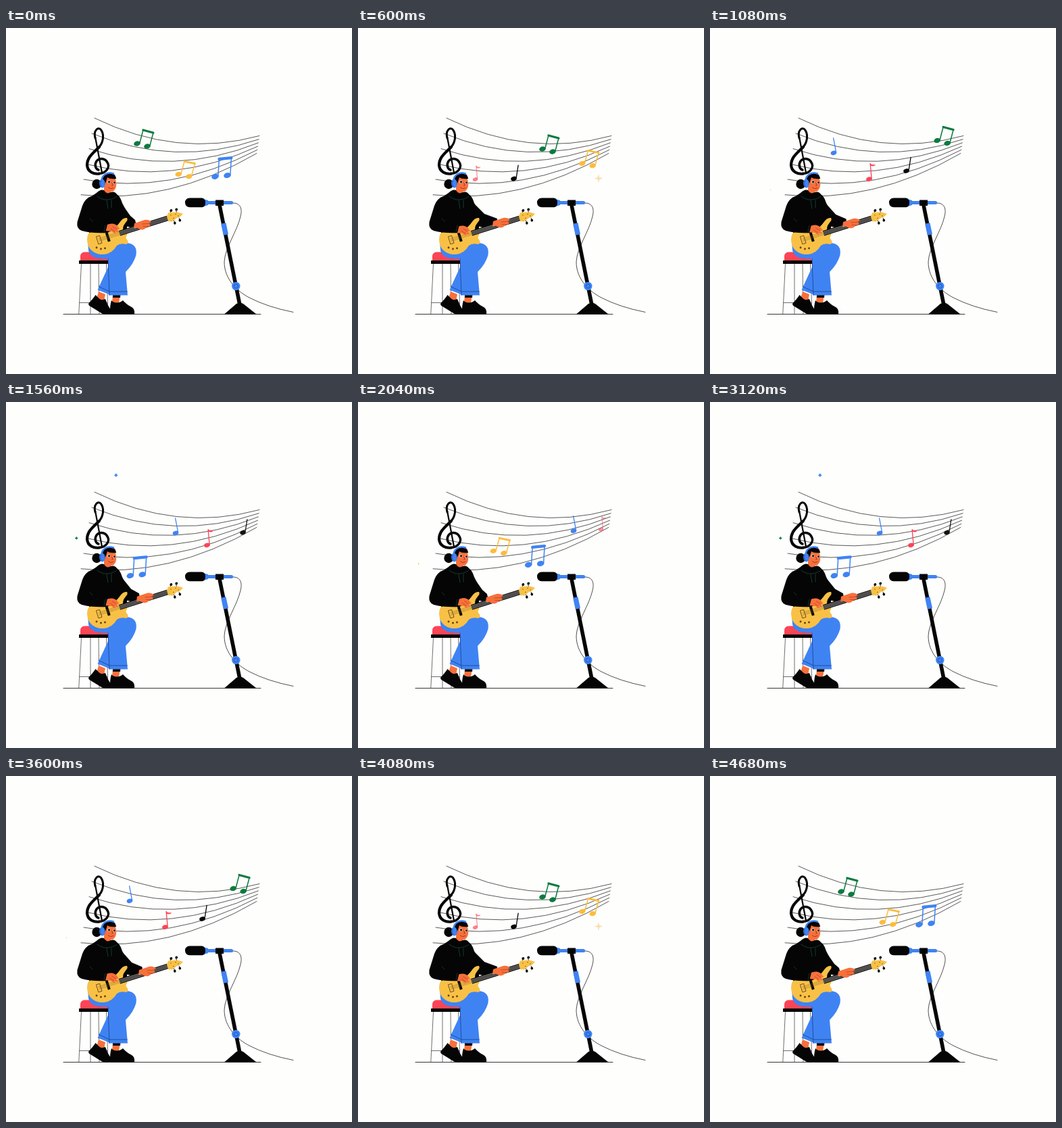
An HTML page with a canvas for the animation above (4800 ms loop, 512x512 px).

```html
<!DOCTYPE html>
<html lang="en">
<head>
<meta charset="utf-8">
<title>Guitar player</title>
<style>
html, body { margin: 0; width: 100%; height: 100%; overflow: hidden; background: #fefefd; }
canvas { display: block; width: 512px; height: 512px; }
</style>
</head>
<body>
<canvas id="stage" width="512" height="512"></canvas>
<script>
const ctx = document.getElementById('stage').getContext('2d');
const BLACK = '#050505', BLUE = '#3f83f3', RED = '#fb4455', GOLD = '#f8c146',
      YELLOW = '#fbbc3c', GREEN = '#0c7a3e', SKIN = '#f8703b';
const STEP = 120, HALF = 20, CYCLE = 20.35;

function fill(d, color) {
  ctx.fillStyle = color;
  ctx.fill(new Path2D(d));
}
function line(d, color = BLACK, width = 0.7) {
  ctx.strokeStyle = color;
  ctx.lineWidth = width;
  ctx.stroke(new Path2D(d));
}
function oval(x, y, rx, ry, color, turn = 0) {
  ctx.fillStyle = color;
  ctx.beginPath();
  ctx.ellipse(x, y, rx, ry, turn, 0, Math.PI * 2);
  ctx.fill();
}
const clamp = v => Math.max(0, Math.min(1, v));

// Eased value through [phase, value] keys
function keyed(keys, p) {
  for (let i = 1; i < keys.length; i++) {
    const [a, u] = keys[i - 1], [b, v] = keys[i];
    if (p <= b) return u + (v - u) * (1 - Math.cos(Math.PI * (p - a) / (b - a))) / 2;
  }
  return keys[keys.length - 1][1];
}

// Parabola through three points
function curveY([[a, ya], [b, yb], [c, yc]], x) {
  return ya * (x - b) * (x - c) / ((a - b) * (a - c))
       + yb * (x - a) * (x - c) / ((b - a) * (b - c))
       + yc * (x - a) * (x - b) / ((c - a) * (c - b));
}

function staff() {
  for (let i = 0; i < 6; i++) {
    const x0 = 131 - 4 * i, x1 = 375 - 0.8 * i;
    line(`M${x0} ${133.3 + 22.7 * i}Q${(x0 + x1) / 2} ${193 + 13.6 * i} ${x1} ${159.5 + 5.2 * i}`, '#222', 0.75);
  }
}

function clef() {
  line('M132 161L142 214', BLACK, 2.2);
  line('M132 163C129 152 136 146 140 150C146 157 144 169 138 176', BLACK, 3);
  line('M138 176C129 185 120 191 120 203C121 214 131 216.5 138 215.5', BLACK, 4.2);
  line('M138 215.5C149 214.5 153 206 151 201C148 193 139 191 134 197C130 203 133 209 137 210', BLACK, 3.4);
}

function pair(gap, tilt, rise, lean, beam, r) {
  const color = ctx.fillStyle;
  for (const s of [-0.5, 0.5]) {
    const x = gap * s, y = tilt * s;
    oval(x, y, r, r * 0.72, color, -0.25);
    line(`M${x + r - 1} ${y - 1}L${x + r - 1 + lean} ${y - rise}`, color, 1.5);
  }
  const l = -gap / 2 + r - 1 + lean, t = -tilt / 2 - rise;
  line(`M${l} ${t}L${l + gap} ${t + tilt}`, color, beam);
}
function single(lean, rise, flag) {
  oval(0, 0, 4.4, 3.2, ctx.fillStyle, -0.3);
  line(`M3.6 -1L${3.6 + lean} ${-rise}`, ctx.fillStyle, 1.3);
  if (flag) fill(`M${3.2 + lean} ${-rise - 1}q3 4 8 2q-1 4 -7 2z`, ctx.fillStyle);
}

// x at phase 0, speed per step, span between repeats
const notes = [
  { color: GREEN, x: 201.5, v: 15.8, span: 322, path: [[164, 160], [201.5, 173], [280.5, 181]],
    draw: () => pair(15, 4, 20, 5, 3.2, 4.9) },
  { color: YELLOW, x: 263, v: 15.3, span: 315, path: [[223.5, 221.5], [263, 218], [339.5, 202]],
    draw: () => pair(15.5, 3.2, 19, 5, 2.8, 4.8) },
  { color: BLUE, x: 318.5, v: 17.1, span: 348, path: [[194, 256], [279.5, 234], [318.5, 219]],
    draw: () => pair(18, -1.8, 26, 1.5, 4.2, 5.4) },
  { color: BLUE, x: 30, v: 17, span: 346, path: [[175, 183], [251, 194], [336, 188]],
    draw: () => single(-4, 22) },
  { color: RED, x: 96, v: 15.5, span: 315, path: [[173, 224], [297, 212], [350, 193]],
    draw: () => single(-2, 23, true) },
  { color: BLACK, x: 155.5, v: 15, span: 305, path: [[231, 223], [300, 209], [351, 193]],
    draw: () => single(3, 20) }
];

function drawNotes(p) {
  for (const n of notes) {
    let x = n.x + n.v * p;
    if (x > 375) x -= n.span;
    const seen = Math.min(clamp((x - 156) / 26), clamp((375 - x) / 26));
    if (!seen) continue;
    const size = 0.55 + 0.45 * seen;
    ctx.save();
    ctx.globalAlpha = seen;
    ctx.translate(x, curveY(n.path, x));
    ctx.scale(size, size);
    ctx.fillStyle = n.color;
    n.draw();
    ctx.restore();
  }
}

// pulses: [middle, half width, radius]
const sparks = [
  { x: 162.8, y: 108.3, color: BLUE, pulses: [[2, 2, 11], [13, 3, 3]] },
  { x: 104.3, y: 201.5, color: GREEN, pulses: [[2, 2, 6.3], [13, 3, 2.5]] },
  { x: 89.6, y: 239.2, color: YELLOW, pulses: [[7.5, 2, 3.5], [18, 2, 2.6]] },
  { x: 356, y: 222.5, color: '#f9dfae', pulses: [[5, 3, 6.5]] }
];
function drawSparks(p) {
  for (const s of sparks) for (const [mid, half, peak] of s.pulses) {
    const r = peak * (1 - Math.abs(p - mid) / half);
    if (r <= 0) continue;
    const k = r * (peak < 4 ? 0.55 : 0.3);
    let d = '';
    for (let i = 0; i < 8; i++) {
      const a = i * Math.PI / 4, q = i % 2 ? k : r;
      d += `${i ? 'L' : 'M'}${s.x + q * Math.sin(a)} ${s.y - q * Math.cos(a)}`;
    }
    fill(d + 'z', s.color);
  }
}

function microphone() {
  line('M334 259C347 258 350 267 347 279C342 301 324 325 323 346C323 371 341 389 360 399Q387 413 425 420.5');
  fill('M323 423.5L341 408Q346 405 351 408L370.5 423.5z', BLACK);
  ctx.lineCap = 'butt';
  line('M316 262L346 410', BLACK, 5.6);
  line('M321.8 289L325.4 306', BLUE, 7.4);
  oval(340.3, 382, 6.2, 6.2, BLUE);
  ctx.strokeStyle = '#1c4fa8';
  ctx.lineWidth = 0.8;
  ctx.beginPath();
  ctx.arc(340.3, 382, 3, 0, 7);
  ctx.stroke();
  line('M296 258.5H333', BLUE, 5.2);
  ctx.lineCap = 'round';
  line('M331 258.5H333.5', BLUE, 5.2);
  fill('M293 253.5L299 255V262L293 264z', BLUE);
  fill('M272 251.5H290Q295 252 295 258.5Q295 265 290 265.2H272Q265 265 265 258.3Q265 252 272 251.5z', BLACK);
  fill('M310 254.5H322V263H310z', BLACK);
}

function stool() {
  line('M111.5 349L107.8 423M125 349V423M137 349L138 423M148.5 349L151 423M108.8 406.5H150', '#333', 0.7);
  fill('M110 345L110 337Q111 331.5 117 331.5H143Q151 332 151 345z', RED);
  fill('M108 344H152V349H108z', BLACK);
}

function legs() {
  fill('M137 390L147 394L145 404L137 403L135 397z', SKIN);
  fill('M158 395H169L167 407H157z', SKIN);
  fill('M158 394H169.5L169 399H158z', BLACK);
  fill('M132.5 395Q127 403 122.5 407Q121 410 125 412L142 422.5Q145 423.8 155 423.3V417Q150 410 147 401Q140 404 136.5 399z', BLACK);
  fill('M156 403Q153 413 154.5 423.4H190Q191 416 186 413Q178 409 173 403Q166 409 158 405z', BLACK);
  fill('M121 315L122 329Q124 339 138 341L151 342L151 354L135.5 387.5L152 394V395.5H180L177 361Q189 349 192.5 336Q195 319 178 318L160 304z', BLUE);
  line('M137 382.5L152 389.5M153 390H179.5M151 342L153 395', '#163c83', 0.75);
}

function head() {
  oval(134.3, 231, 7, 7.2, BLACK);
  fill('M145 234L157 238L153 249Q148 250 145 245z', SKIN);
  fill('M145 221Q148 217 157 218Q163 221 163.3 231Q163 240 157 242Q148 242 144 233z', SKIN);
  fill('M143 231Q140 218 150 215Q162 213 163.2 223Q154 224 150 221Q148 228 146 232z', BLACK);
  line('M141.5 226C142 217 150 212.5 159 215.5', BLUE, 2.6);
  oval(142.4, 230, 4.3, 6.6, BLUE, -0.1);
  line('M140 226Q138 231 141 235', '#1c54b5', 0.9);
  oval(152.3, 227.8, 2, 2.5, '#fff');
  oval(160.2, 228.8, 1.7, 2.3, '#fff');
  oval(152.5, 227.8, 1.4, 1.9, BLACK);
  oval(160.4, 228.8, 1.3, 1.8, BLACK);
  line('M156.8 229L158.2 232.6L156.4 233M151.5 236Q155 239 159 236.3', '#8d2d18', 0.8);
}

function torso() {
  fill('M134 244Q140 238 145 240Q149 247 155 243Q161 241 164 246Q169 249 172 259L182 279L178 301L158 307L125 306Q121 303 124 291L110 286Q113 260 122 252z', BLACK);
  line('M135 249Q142 255 151 254Q160 253 164 249M149 255L151 267M156 255V266', '#174b40', 0.8);
}

function guitar() {
  fill('M122 304Q127 300 137 302Q149 305 154 301Q163 295 168 288Q173 280 179 281Q181 284 177 288Q171 295 174 302Q181 303 179 307Q176 310 179 313Q183 318 178 320Q169 318 164 322Q157 334 145 335Q129 336 122 323Q118 312 122 304z', GOLD);
  ctx.save();
  ctx.translate(145, 311);
  ctx.rotate(-0.305);
  fill('M24 -3.8H99V4H24z', BLACK);
  fill('M4 -6.5H8V7H4z', BLACK);
  line('M-10 -5.5H-5V6H-10z', '#5c3e16', 0.8);
  line('M24 -1.9H98M24 0.1H99M24 2.1H98', '#f4efe4', 0.6);
  line('M-8 -1.9H24M-8 0.1H24M-8 2.1H24', '#8a6423', 0.45);
  ctx.restore();
  for (const [x, y] of [[134, 325], [140.5, 327], [146.5, 326]]) oval(x, y, 1.4, 1.4, '#5c3e16');
  line('M244 275L242.8 270M252.5 273L251 268.5M248 284L250 288.5M256 281L257.5 285.5', '#333', 1);
  for (const [x, y] of [[244.5, 270], [252.3, 268.5], [249.8, 288.7], [257.3, 284.6]]) oval(x, y, 1.8, 2.1, BLACK);
  fill('M238 279L240 273.5L249 272.5L256 273L262 275L258 279L253 281L246 286.5L240 286z', GOLD);
  for (const [x, y] of [[244, 277], [251, 275.5], [248, 281.5], [255, 278]]) oval(x, y, 0.7, 0.7, '#71501d');
}

// Arm behind the guitar, sliding along the neck
function farArm(slide) {
  const lift = slide * 0.3;
  fill(`M170 258L${184 + lift} ${278 - lift}L${191 + slide * 1.5} ${284 - slide * 0.2}L${193 + slide * 1.3} 292L184 295L174 292z`, BLACK);
}
function farHand(slide) {
  ctx.save();
  ctx.translate(slide, -slide * 0.3);
  fill('M190 289L199 286L205 284Q211 283 215 287Q213 289 211 289L214 291.5Q213 294 209 294L205 297.5Q199 300 195 296L189 296z', SKIN);
  line('M202 290L211 289.5M203 293.5L209 294', '#9c351a', 0.6);
  ctx.restore();
}

function nearArm(strum) {
  ctx.save();
  ctx.translate(-strum * 0.7, strum);
  fill('M146 292L153 290Q160 288 165 293L168 297Q168 299 164 298L167 301.5Q164 304 161 300L163 304Q160 305 157 301L146 300z', SKIN);
  line('M158 294L164 298M155 297L161 301', '#9c351a', 0.6);
  ctx.restore();
  fill('M126 249Q117 252 113 263L105.5 287Q104 297 112 300Q128 304 147 303L150 291L128 286L135 269z', BLACK);
  line('M128 286L124 282M147 292L145 302', '#174b40', 0.7);
}

function draw(now) {
  const i = Math.floor(now / STEP) % (HALF * 2);
  const p = i < HALF ? i : HALF * 2 - 1 - i;
  const slide = keyed([[0, 0], [5, 10], [13, 4], [18, -0.5], [CYCLE, 0]], p);
  const strum = keyed([[0, 0], [5, 3], [13, 1], [18, 0.6], [CYCLE, 0]], p);
  ctx.fillStyle = '#fefefd';
  ctx.fillRect(0, 0, 512, 512);
  ctx.lineCap = ctx.lineJoin = 'round';
  staff();
  clef();
  drawNotes(p);
  drawSparks(p);
  line('M85 423.5H377', '#222', 0.9);
  microphone();
  stool();
  legs();
  head();
  torso();
  farArm(slide);
  guitar();
  farHand(slide);
  nearArm(strum);
}

const start = performance.now();
function tick() {
  draw(performance.now() - start);
  requestAnimationFrame(tick);
}
tick();
</script>
</body>
</html>
```
